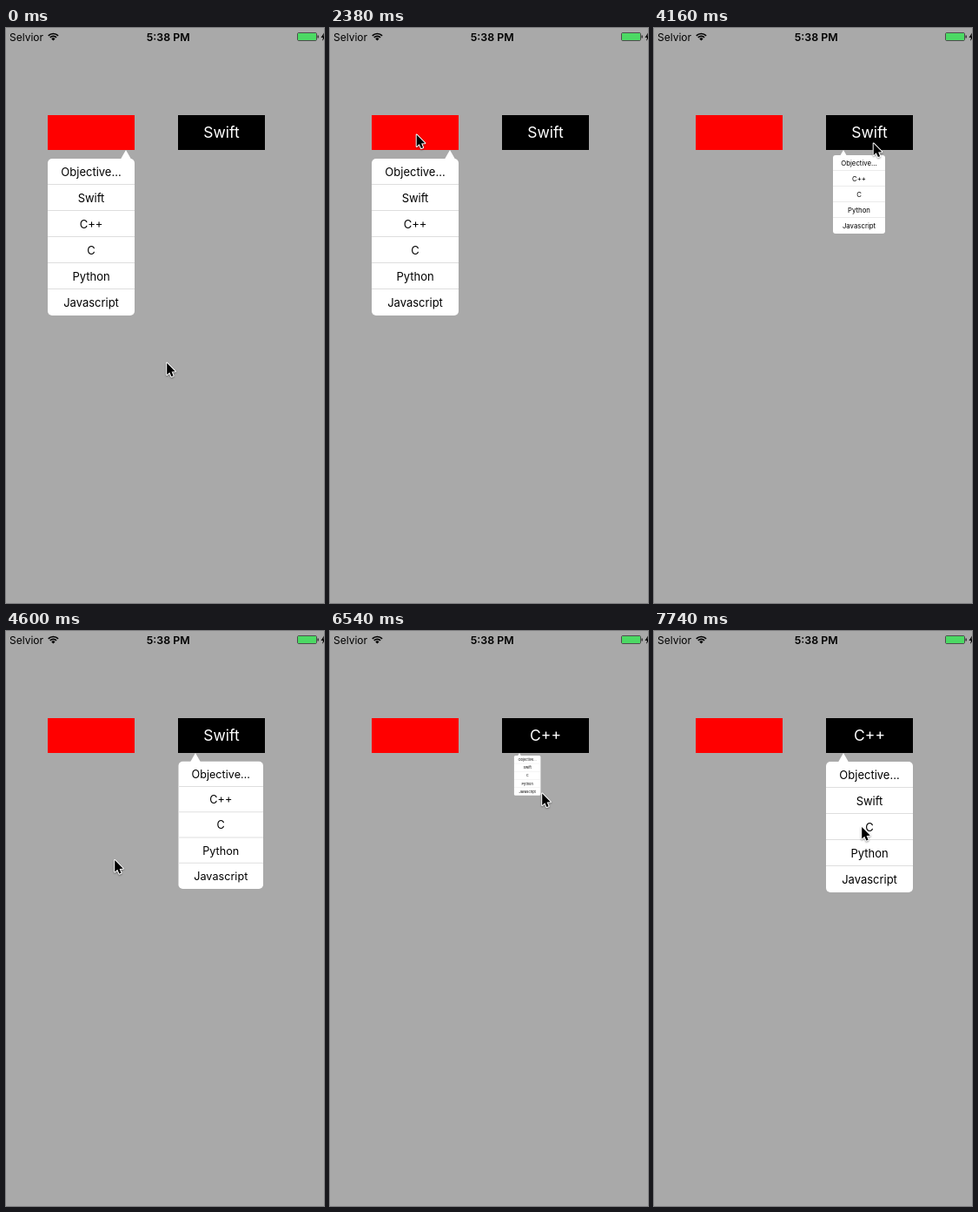
An HTML page with a canvas for the animation above (8 s loop, 366 by 660 pixels).

```html
<!DOCTYPE html>
<html lang="en">
<head>
<meta charset="utf-8">
<title>Dropdown menus</title>
<style>
html, body { margin: 0; width: 100%; height: 100%; overflow: hidden; background: #a9a9a9; }
canvas { display: block; width: 366px; height: 660px; }
</style>
</head>
<body>
<canvas id="stage" width="366" height="660"></canvas>
<script>
const ctx = document.getElementById('stage').getContext('2d');
const LOOP = 8000;
const TICK = 148.6; // the screen refreshes once per tick
const FONT = 'Inter, Roboto, sans-serif';
const LANGS = ['Objective…', 'Swift', 'C++', 'C', 'Python', 'Javascript'];
const PICK_TICK = 44;

// spans: ticks at which each menu starts to open and to close
const LEFT = { x: 48, tip: 138, spans: [[-1, 9.05], [14.3, 20.05]] };
const RIGHT = { x: 198, tip: 218, spans: [[27.4, 30.975], [37.96, 43.305], [48.4, 60]] };

const HOME = { x: 184.5, y: 383.5 };
const MOVES = [
  { from: 5, ticks: 3, x: 115.5, y: 306.5 },
  { from: 11, ticks: 3, x: 99, y: 121.5 },
  { from: 18, ticks: 2, x: 93.5, y: 168 },
  { from: 22, ticks: 3, x: 254, y: 142 },
  { from: 26, ticks: 1, x: 252, y: 131.5 },
  { from: 29, ticks: 3, x: 124.5, y: 262 },
  { from: 33, ticks: 5, x: 238.5, y: 123 },
  { from: 40, ticks: 3, x: 243.5, y: 185.5 },
  { from: 45, ticks: 3, x: 238.5, y: 125 },
  { from: 50, ticks: 3, x: 238.5, y: 224 }
];

const clamp = v => Math.min(1, Math.max(0, v));
const ease = v => v * v * (3 - 2 * v);
const mix = (a, b, v) => a + (b - a) * v;

function pointerAt(tick) {
  return MOVES.reduce((p, m) => {
    const v = ease(clamp((tick - m.from + 1) / m.ticks));
    return { x: mix(p.x, m.x, v), y: mix(p.y, m.y, v) };
  }, HOME);
}

// Opening and closing each take one tick.
function scaleAt(spans, tick) {
  return spans.reduce((sum, [open, close]) => sum + clamp(tick - open) - clamp(tick - close), 0);
}

function box(x, y, w, h, color) {
  ctx.fillStyle = color;
  ctx.fillRect(x, y, w, h);
}

function label(text, x, y, size, color, align = 'center', weight = 400) {
  ctx.font = `${weight} ${size}px ${FONT}`;
  ctx.textAlign = align;
  ctx.textBaseline = 'alphabetic';
  ctx.fillStyle = color;
  ctx.fillText(text, x, y);
}

function trace(points) {
  ctx.beginPath();
  points.forEach(([x, y]) => ctx.lineTo(x, y));
  ctx.closePath();
}

function round(x, y, w, h, r) {
  ctx.beginPath();
  ctx.roundRect(x, y, w, h, r);
}

function wifi(x, y) {
  const from = -Math.PI * 0.75, to = -Math.PI * 0.25;
  ctx.strokeStyle = ctx.fillStyle = '#000';
  ctx.lineWidth = 1.7;
  for (const r of [5.1, 8]) {
    ctx.beginPath();
    ctx.arc(x, y, r, from, to);
    ctx.stroke();
  }
  ctx.beginPath();
  ctx.moveTo(x, y);
  ctx.arc(x, y, 3, from, to);
  ctx.fill();
}

function battery() {
  ctx.strokeStyle = '#4c4c4c';
  ctx.lineWidth = 1;
  round(335.5, 5.5, 22, 9, 1.5);
  ctx.stroke();
  box(336, 6, 21, 8, '#4cd964');
  box(358.5, 8.5, 1.3, 3, '#222');
  trace([[366, 5.5], [362.5, 11], [365, 11], [364, 15], [368, 9.5], [365.5, 9.5]]);
  ctx.fillStyle = '#000';
  ctx.fill();
}

function statusBar() {
  label('Selvior', 4, 14.5, 12, '#000', 'left');
  wifi(54.4, 14.5);
  label('5:38 PM', 186.7, 14.5, 12.4, '#000', 'center', 600);
  battery();
}

function menu({ x, tip, spans }, items, tick) {
  const scale = scaleAt(spans, tick);
  if (scale < 0.01) return;
  ctx.save();
  ctx.translate(tip, 140);
  ctx.scale(scale, scale);
  ctx.translate(-tip, -140);
  ctx.fillStyle = '#fff';
  trace([[tip, 140], [tip + 6, 150.5], [tip - 6, 150.5]]);
  ctx.fill();
  round(x, 150, 100, items.length * 30, 5);
  ctx.fill();
  items.forEach((item, i) => {
    const y = 150 + i * 30;
    label(item, x + 50, y + 19.7, 13, '#000');
    if (i < items.length - 1) box(x, y + 29, 100, 1, '#dedede');
  });
  ctx.restore();
}

function pointer({ x, y }) {
  ctx.save();
  ctx.translate(x + 0.7, y + 1);
  trace([[0, 0], [0, 13.6], [3.1, 10.8], [5.2, 15.6], [7.4, 14.7], [5.4, 10], [9.6, 9.7]]);
  ctx.lineJoin = 'round';
  ctx.shadowColor = 'rgba(0,0,0,0.4)';
  ctx.shadowBlur = 2;
  ctx.shadowOffsetY = 1;
  ctx.strokeStyle = '#fff';
  ctx.lineWidth = 2;
  ctx.stroke();
  ctx.shadowColor = 'transparent';
  ctx.fillStyle = '#000';
  ctx.fill();
  ctx.restore();
}

function draw(now) {
  const tick = Math.floor((now % LOOP + 10) / TICK);
  const choice = tick < PICK_TICK ? 'Swift' : 'C++';
  box(0, 0, 366, 660, '#a9a9a9');
  statusBar();
  box(48, 100, 100, 40, '#f00');
  box(198, 100, 100, 40, '#000');
  label(choice, 248, 126.4, 17.5, '#fff');
  menu(LEFT, LANGS, tick);
  menu(RIGHT, LANGS.filter(name => name !== choice), tick);
  pointer(pointerAt(tick));
}

const start = performance.now();
function loop() {
  draw(performance.now() - start);
  requestAnimationFrame(loop);
}
loop();
</script>
</body>
</html>
```
